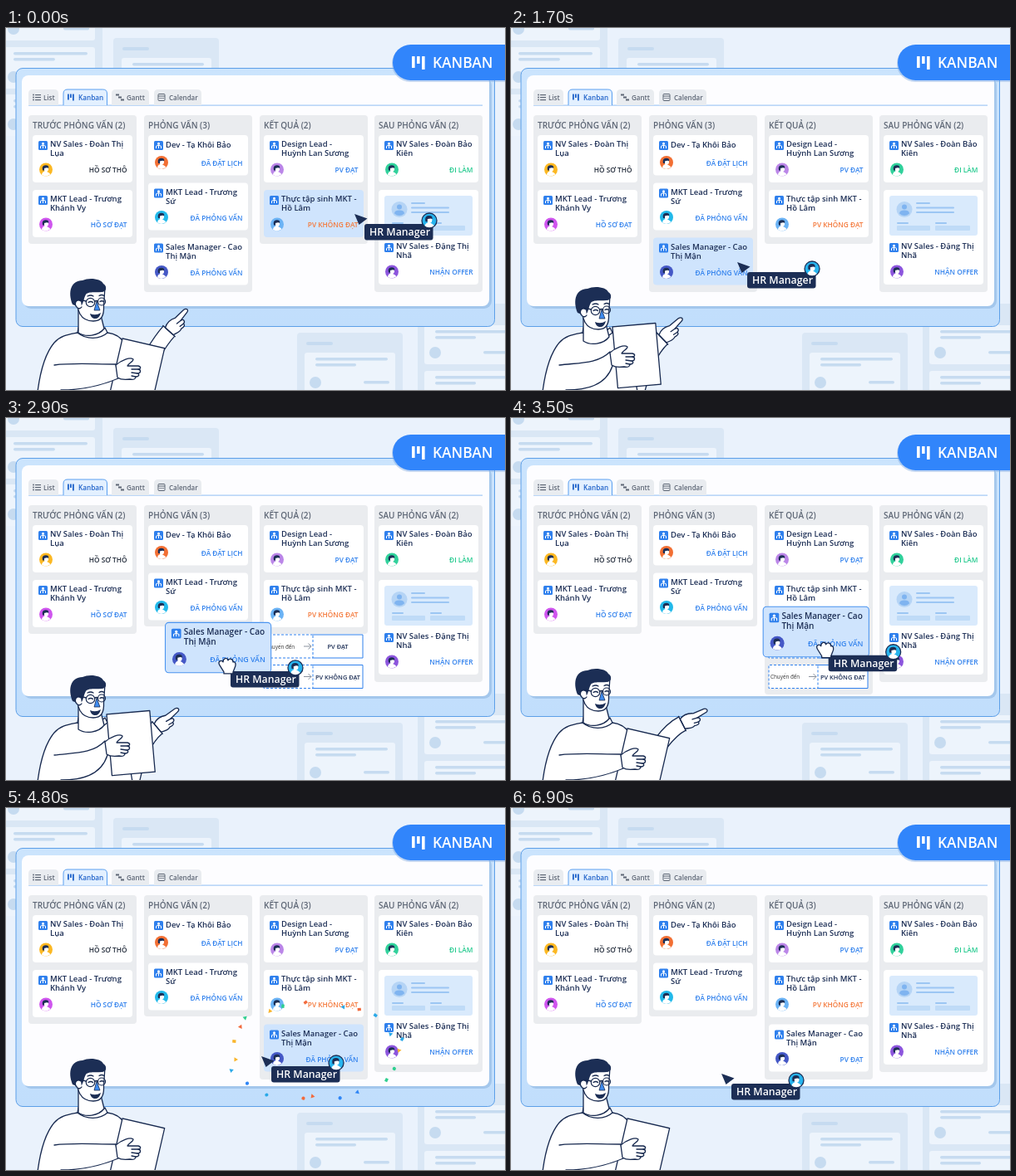
Animation, 600 px wide and 436 px high, one loop 7 s. Source, as an HTML page:

```html
<!DOCTYPE html>
<html lang="vi">
<head>
<meta charset="utf-8">
<title>Kanban</title>
<style>
html, body { margin: 0; width: 100%; height: 100%; overflow: hidden; background: #eaf2fc; }
svg { display: block; }
text { font-family: "Open Sans", "Noto Sans", sans-serif; }
.ink { fill: #fff; stroke: #17294f; stroke-width: 1.3; stroke-linejoin: round; stroke-linecap: round; }
.line { fill: none; }
</style>
</head>
<body>
<svg id="stage" width="600" height="436" viewBox="0 0 600 436"></svg>
<script>
const NAVY = '#1c2e55', BLUE = '#2f80ed', GREY = '#5d6675', HOVER = '#cfe4fd';
const LOOP = 7000, GRAB = 2400, DROP = 3800;

const clamp = u => Math.max(0, Math.min(1, u));
const mix = (a, b, u) => a + (b - a) * u;
const ease = u => u * u * (3 - 2 * u);
const ramp = (t, from, to) => ease(clamp((t - from) / (to - from)));

// SVG builders
const rect = (x, y, w, h, fill, r = 0, more = '') =>
  `<rect x="${x}" y="${y}" width="${w}" height="${h}" rx="${r}" fill="${fill}" ${more}/>`;
const dot = (x, y, r, fill, more = '') => `<circle cx="${x}" cy="${y}" r="${r}" fill="${fill}" ${more}/>`;
const path = (d, more = 'class="ink"') => `<path d="${d}" ${more}/>`;
const text = (x, y, s, size, fill, weight = 600, anchor = 'start', id = '') =>
  `<text x="${x}" y="${y}" font-size="${size}" fill="${fill}" font-weight="${weight}" text-anchor="${anchor}" id="${id}">${s}</text>`;
const group = (id, inner, more = '') => `<g id="${id}" ${more}>${inner}</g>`;

// Pale board pieces in the backdrop
const pale = '#c6dbf0';
const ghostCard = (x, y, w, h) => rect(x, y, w, h, '#edf4fc', 3) +
  rect(x + 13, y + 6, w - 22, 3.5, pale, 1.7) + rect(x + 13, y + 13, w * .45, 3.5, pale, 1.7) +
  dot(x + 13, y + h - 14, 7, pale) + rect(x + w - 38, y + h - 16, 31, 3.5, pale, 1.7);
const ghostColumn = (x, y, w, h) => rect(x, y, w, h, '#dae7f5', 4) + rect(x + 11, y + 11, 32, 4, pale, 2);

const backdrop = () => rect(0, 0, 600, 436, '#eaf2fc') +
  ghostColumn(-14, -40, 130, 170) + ghostCard(-4, -35, 111, 50) + ghostCard(-4, 23, 111, 50) + ghostCard(-4, 80, 111, 50) +
  ghostColumn(129, 12, 127, 90) + ghostCard(139, 36, 108, 50) +
  ghostColumn(350, 367, 127, 80) + ghostCard(359, 391, 109, 50) +
  ghostColumn(495, 332, 127, 120) + ghostCard(503, 358, 109, 47) + ghostCard(503, 413, 109, 50);

const bars = (x, y, k, fill) => [14, 9, 16].map((h, i) => rect(x + i * 6 * k, y, 3.6 * k, h * k, fill, .6 * k)).join('');

const tab = (x, w, label, on) =>
  path(`M${x} 93V79q0-5 5-5h${w - 10}q5 0 5 5v14`, on ? 'fill="#e3f0ff" stroke="#5a9ff0"' : 'fill="#e9ecf0"') +
  text(x + 18, 86.5, label, on ? 8.2 : 8, on ? '#1f62c9' : GREY);

const tabIcons = () => [0, 1, 2].map(i =>
    dot(33, 80.5 + i * 3, .9, GREY) + rect(35, 80 + i * 3, 7, 1.2, GREY) +
    rect(132 + i * 3, 79.5 + i * 3, 4, 2, GREY)).join('') +
  bars(74, 79.5, .5, '#1f62c9') +
  rect(183, 79.5, 8, 8, 'none', 1, `stroke="${GREY}"`) + rect(183, 81.5, 8, 1, GREY) +
  [0, 1, 2].map(i => rect(184.5 + i * 2, 84, 1.2, 1.2, GREY)).join('');

const avatar = (x, y, color, r = 8) => `<g transform="translate(${x} ${y}) scale(${r / 8})">` + dot(0, 0, 8, color) +
  path('M-5 6.2Q-4.5 2.4-1 2.2T5.5 5.8Q0 9.8-5 6.2Z', 'fill="#fff"') +
  path('M-4 1Q-5.5-5-.5-5.3Q3.5-5.5 3.2-2L1 1Z', `fill="${NAVY}"`) +
  path('M-2-1.5Q2-3 3-1.5Q3.4 1.8 1 2.4L.5 4L-1.8 3Z', 'fill="#fff"') + '</g>';

const appIcon = (x, y) => rect(x, y, 11, 11, BLUE, 1.5) + dot(x + 5.5, y + 3.3, 1.5, '#fff') +
  path(`M${x + 2.5} ${y + 9}V${y + 6.3}L${x + 5.5} ${y + 5}L${x + 8.5} ${y + 6.3}V${y + 9}M${x + 5.5} ${y + 5}V${y + 9}`,
    'fill="none" stroke="#fff"');

function card(id, x, y, lines, status, color, face, extra = 0) {
  const lift = lines.length < 2 ? -8.5 : 0, top = y + extra;
  return rect(x, y, 120, 57 + extra + lift, '#fff', 4, `id="${id}"`) + appIcon(x + 7, top + 7) +
    lines.map((s, i) => text(x + 21, top + 14 + i * 11.4 - lift / 6, s, 9.5, NAVY)).join('') +
    avatar(x + 16, top + 41.5 + lift, face) +
    text(x + 113.5, top + 45.3 + lift, status, 8.3, color, 600, 'end', id + 'Status');
}

const column = (id, x, bottom, title) => rect(x, 105, 130, bottom - 105, '#eaecef', 4, `id="${id}"`) +
  text(x + 5, 120.7, title, 10, GREY, 600, 'start', id + 'Title');

const picture = () => rect(455, 202, 106, 48, '#d9eafc', 3) + dot(473, 218.5, 9.5, '#b5d4f5') +
  dot(473, 215.5, 3, '#7fb4f0') + path('M467 223.5q0-4 6-4t6 4q-6 5-12 0', 'fill="#7fb4f0"') +
  [[487, 210, 17], [487, 215.5, 46], [487, 221, 46], [464, 234, 14], [510, 234, 14]]
    .map(([x, y, w]) => rect(x, y, w, 2, '#9cc6f3', 1)).join('') +
  rect(464, 238, 40, 6, '#bfdbf7', 1) + rect(510, 238, 42, 6, '#bfdbf7', 1);

const zone = (y, label) => rect(310, y, 119, 28, '#fff') +
  path(`M369 ${y}H310V${y + 28}H369V${y}`, `fill="none" stroke="${BLUE}" stroke-dasharray="3 2"`) +
  path(`M369 ${y}H429V${y + 28}H369`, `fill="none" stroke="${BLUE}"`) +
  text(312, y + 16.5, 'Chuyển đến', 6.3, '#333', 500) +
  path(`M358 ${y + 14}h9m-3.5-3.5l3.5 3.5l-3.5 3.5`, 'fill="none" stroke="#8a929e"') +
  text(399, y + 17, label, 7.4, NAVY, 600, 'middle');

const face = () =>
  path('M87 338L87 367C96 373 111 371 118 362L114 346') +
  path('M85 318C84 342 90 353 105 353C115 353 118 346 117.5 335L119 312Z') +
  path('M80 333C74 318 78 304 92 304C100 300 115 302 117 308C122 311 121 318 115 318C108 319 99 317 96 321C93 326 93 335 88 336Z', `fill="${NAVY}"`) +
  path('M90 329C84 325 81 333 86 337Q89 339 91 336') +
  path('M109 329L113 340L106 340Z', 'fill="#3f8cf0" stroke="#17294f" stroke-width=".8"') +
  dot(101.5, 330.5, 5.2, 'none', 'stroke="#17294f" stroke-width="1.2"') +
  dot(115, 329.5, 4.5, 'none', 'stroke="#17294f" stroke-width="1.2"') +
  path('M96.3 329L88 327M106.7 329.5Q108.5 327.5 110.5 329M98 323Q102 321 105 323M112 322.5Q115 320.5 118 322.5', 'class="ink line"') +
  path('M101 344Q108 347 114 343Q112 351 106 350Q102 349 101 344Z', `fill="${NAVY}"`) +
  path('M99 330.5Q102 328.5 104.5 330.5M113 329.5Q115 328 117.5 329.5', 'class="ink line"');

const person = () =>
  group('arm', path('', 'id="sleeveEdge" fill="none" stroke="#17294f" stroke-width="19.5"') +
    path('', 'id="sleeve" fill="none" stroke="#fff" stroke-width="16.9"') +
    group('point', path('M0-6C6-9 12-8 17-5L31-4C35-3 35 1 31 1L19 2C23 3 22 7 18 7C19 10 15 10 12 9C8 11 4 8 0 7Z') +
      path('M0-9.7V9.7M19 2L13 1M18 7L13 6', 'class="ink line"'))) +
  path('M38 438C41 415 47 392 58 379C66 370 76 369 86 367L87 361C97 370 111 369 119 361L122 367C130 368 137 371 142 379L152 438Z') +
  path('M86 367C97 376 113 375 122 367', 'class="ink line"') +
  group('board', path('M0 0H52V74H0Z')) +
  path('', 'id="forearm" fill="#fff"') + path('', 'id="forearmEdge" class="ink line"') +
  group('grip', path('M-15-6C-8-12 2-16 6-13C6-10 0-8-1-5L12-5C16-4 15-1 12-1C16 0 15 4 11 4C14 5 13 8 9 8C9 11 6 12 2 11C-5 12-10 11-13 9Z') +
    path('M12-1L4-1M11 4L4 3M9 8L4 7', 'class="ink line"')) +
  group('head', face());

const pointer = () => group('cursor',
  path('M-12-12L3.5-6.5L-6.5 1Z', `id="arrow" fill="${NAVY}"`) +
  rect(0, 0, 82.5, 19.5, NAVY, 3) + text(6, 14.3, 'HR Manager', 12.3, '#fff') +
  avatar(78, -4, '#27b4ee', 9) + dot(78, -4, 9, 'none', `stroke="${NAVY}" stroke-width="1.3"`) +
  path('M-13-7C-16-12-11-14-9-11C-9-16-4-17-3-13C-1-16 3-15 3-11C6-12 7-8 5-4L3 1V3H-8V1Z', 'id="fist" class="ink"'));

// Confetti, evenly spread in angle with seeded jitter
let seed = 11;
const random = () => (seed = seed * 16807 % 2147483647) / 2147483647;
const tints = ['#f9b52c', '#2f86f6', '#2ecf8f', '#f26a3c', '#b56be8', '#2aa9e8'];
const pieces = Array.from({ length: 22 }, (_, i) => ({
  angle: (i + random() * .8) / 22 * 2 * Math.PI, reach: .9 + random() * .15,
  spin: random() * 600, tint: tints[Math.floor(random() * 6)], shape: Math.floor(random() * 3)
}));
const confetti = () => group('confetti', pieces.map(p => [
  dot(0, 0, 2.1, p.tint), rect(-2.1, -1.7, 4.2, 3.4, p.tint), path('M-2.6-2H2.6L0 2.6Z', `fill="${p.tint}"`)
][p.shape]).join(''));

document.getElementById('stage').innerHTML =
  `<defs><linearGradient id="glass" x2="0" y2="1"><stop stop-color="#cbe4fd"/><stop offset="1" stop-color="#c1defc"/></linearGradient></defs>` +
  backdrop() +
  rect(12, 48.5, 575.5, 311, 'url(#glass)', 8, 'stroke="#5c9fe8"') +
  rect(21, 60, 563, 278, '#8fb7e3', 9, 'opacity=".6"') + rect(19, 57, 562, 278, '#fdfdff', 8) +
  rect(464, 21, 170, 44, '#6f9fdc', 22, 'opacity=".4"') +
  rect(465, 20, 170, 43, '#3185fb', 21.5) + bars(488, 34, 1, '#fff') + text(513, 48, 'KANBAN', 17.4, '#fff') +
  rect(27, 92.6, 546, 1, '#8fbdf3') +
  tab(27, 36, 'List') + tab(69, 52.5, 'Kanban', true) + tab(127, 45, 'Gantt') + tab(178, 57, 'Calendar') + tabIcons() +
  column('col1', 27, 260, 'TRƯỚC PHỎNG VẤN (2)') + column('col2', 166, 318, '') +
  column('col3', 305, 260, '') + column('col4', 443, 318, 'SAU PHỎNG VẤN (2)') +
  card('a1', 32, 129, ['NV Sales - Đoàn Thị', 'Lụa'], 'HỒ SƠ THÔ', '#222b3a', '#fcb822') +
  card('a2', 32, 195, ['MKT Lead - Trương', 'Khánh Vy'], 'HỒ SƠ ĐẠT', BLUE, '#cf55ee') +
  card('b1', 171, 129, ['Dev - Tạ Khôi Bảo'], 'ĐÃ ĐẶT LỊCH', BLUE, '#f26f33') +
  card('b2', 171, 186.5, ['MKT Lead - Trương', 'Sứ'], 'ĐÃ PHỎNG VẤN', BLUE, '#22b9ea') +
  card('c1', 310, 129, ['Design Lead -', 'Huỳnh Lan Sương'], 'PV ĐẠT', BLUE, '#bb86e8') +
  card('c2', 310, 195, ['Thực tập sinh MKT -', 'Hồ Lâm'], 'PV KHÔNG ĐẠT', '#f4793b', '#6bb3f5') +
  card('d1', 448, 129, ['NV Sales - Đoàn Bảo', 'Kiên'], 'ĐI LÀM', '#1fc98c', '#30d19b') +
  card('d2', 448, 195, ['NV Sales - Đặng Thị', 'Nhã'], 'NHẬN OFFER', BLUE, '#8c55dd', 57) + picture() +
  group('zones', zone(261, 'PV ĐẠT') + zone(297.5, 'PV KHÔNG ĐẠT')) +
  group('mover', card('m', 0, 0, ['Sales Manager - Cao', 'Thị Mận'], 'ĐÃ PHỎNG VẤN', BLUE, '#4558c6')) +
  person() + confetti() + pointer();

const $ = id => document.getElementById(id);
const set = (id, name, value) => $(id).setAttribute(name, value);
const move = (id, x, y, more = '') => set(id, 'transform', `translate(${x} ${y}) ${more}`);
const show = (id, opacity) => set(id, 'opacity', +opacity);

function cursorAt(t) {
  const a = ramp(t, 0, 2400), b = ramp(t, 2650, 3600), c = ramp(t, 3900, 5580);
  return [431 - 185 * a + 140 * b - 121 * c, 236 + 73 * a - 24 * b + 47 * c];
}

// time, head drop, board x y turn, grip x y, wrist x y turn
const poses = [
  [0, 0, 140, 374, 13, 147, 412, 196, 365, -48],
  [300, 0, 140, 374, 13, 147, 412, 198, 366, -45],
  [1000, 12, 122, 360, -5, 134, 397, 182, 375, -42],
  [1700, 10, 122, 360, -5, 134, 397, 182, 374, -44],
  [2500, 2, 129, 362, -3, 138, 402, 180, 362, -62],
  [2900, 8, 121, 357, -5, 134, 396, 182, 373, -40],
  [3500, 0, 140, 374, 13, 147, 412, 206, 368, -27],
  [4200, 0, 140, 374, 13, 147, 412, 130, 425, -20]
];
function poseAt(t) {
  const i = poses.findIndex(p => p[0] > t);
  if (i < 0) return poses[poses.length - 1];
  const [a, b] = [poses[i - 1], poses[i]], u = ramp(t, a[0], b[0]);
  return a.map((v, k) => mix(v, b[k], u));
}

function drawPerson(t) {
  const [, head, bx, by, br, gx, gy, wx, wy, wa] = poseAt(t);
  const rad = wa * Math.PI / 180;
  const sleeve = `M150 445Q${wx - 30 * Math.cos(rad)} ${wy - 30 * Math.sin(rad)} ${wx} ${wy}`;
  set('sleeveEdge', 'd', sleeve);
  set('sleeve', 'd', sleeve);
  move('point', wx, wy, `rotate(${wa})`);
  show('arm', t < 4200);
  move('board', bx, by, `rotate(${br})`);
  const cuff = `C80 403 104 405 ${gx - 15} ${gy - 7}L${gx - 12} ${gy + 10}C114 431 90 436 66 436`;
  set('forearm', 'd', `M58 406${cuff}Z`);
  set('forearmEdge', 'd', `M58 406${cuff}`);
  move('grip', gx, gy);
  move('head', 0, head);
}

function drawConfetti(t) {
  const u = clamp((t - 4300) / 1300), out = 1 - (1 - u) ** 2;
  pieces.forEach((p, i) => {
    const x = 372 + Math.cos(p.angle) * 168 * out * p.reach;
    const y = 286 + Math.sin(p.angle) * 98 * out * p.reach + 40 * u * u;
    $('confetti').children[i].setAttribute('transform', `translate(${x} ${y}) rotate(${p.spin * (1 + u)})`);
  });
  show('confetti', u > 0 ? 1 - ramp(t, 5100, 5700) : 0);
}

function draw(t) {
  const [x, y] = cursorAt(t), held = t >= GRAB && t < DROP;
  const over = (cx, cy) => x - 12 > cx && x - 12 < cx + 120 && y - 12 > cy && y - 12 < cy + 57;
  move('cursor', x, y);
  show('arrow', !held);
  show('fist', held);
  set('c2', 'fill', over(310, 195) && t < GRAB ? HOVER : '#fff');

  const up = ramp(t, GRAB - 100, GRAB), down = ramp(t, DROP - 100, DROP + 100), lift = up - down;
  const mx = mix(mix(171, x - 78.5, up), 310, down), my = mix(mix(252.5, y - 58.5, up), 260.5, down);
  move('mover', mx, my, `scale(${1 + .06 * lift})`);
  set('m', 'fill', lift > 0 || (t < GRAB ? over(171, 252.5) : t < 4900) ? HOVER : '#fff');
  set('m', 'stroke', lift > 0 ? '#4a94f0' : 'none');
  $('mStatus').textContent = t < 5000 ? 'ĐÃ PHỎNG VẤN' : 'PV ĐẠT';

  const dropped = t >= DROP;
  set('col2', 'height', mix(213, 146, ramp(t, 2600, 2850)));
  set('col3', 'height', dropped ? 222 : mix(155, 228, ramp(t, 2900, 3200)));
  $('col2Title').textContent = `PHỎNG VẤN (${dropped ? 2 : 3})`;
  $('col3Title').textContent = `KẾT QUẢ (${dropped ? 3 : 2})`;
  show('zones', dropped ? 0 : ramp(t, 2650, 2850));
  drawPerson(t);
  drawConfetti(t);
}

const start = performance.now();
function tick() {
  const t = Math.max(0, performance.now() - start) % LOOP;
  draw(Math.floor(t / 100) * 100);
  requestAnimationFrame(tick);
}
tick();
</script>
</body>
</html>
```
